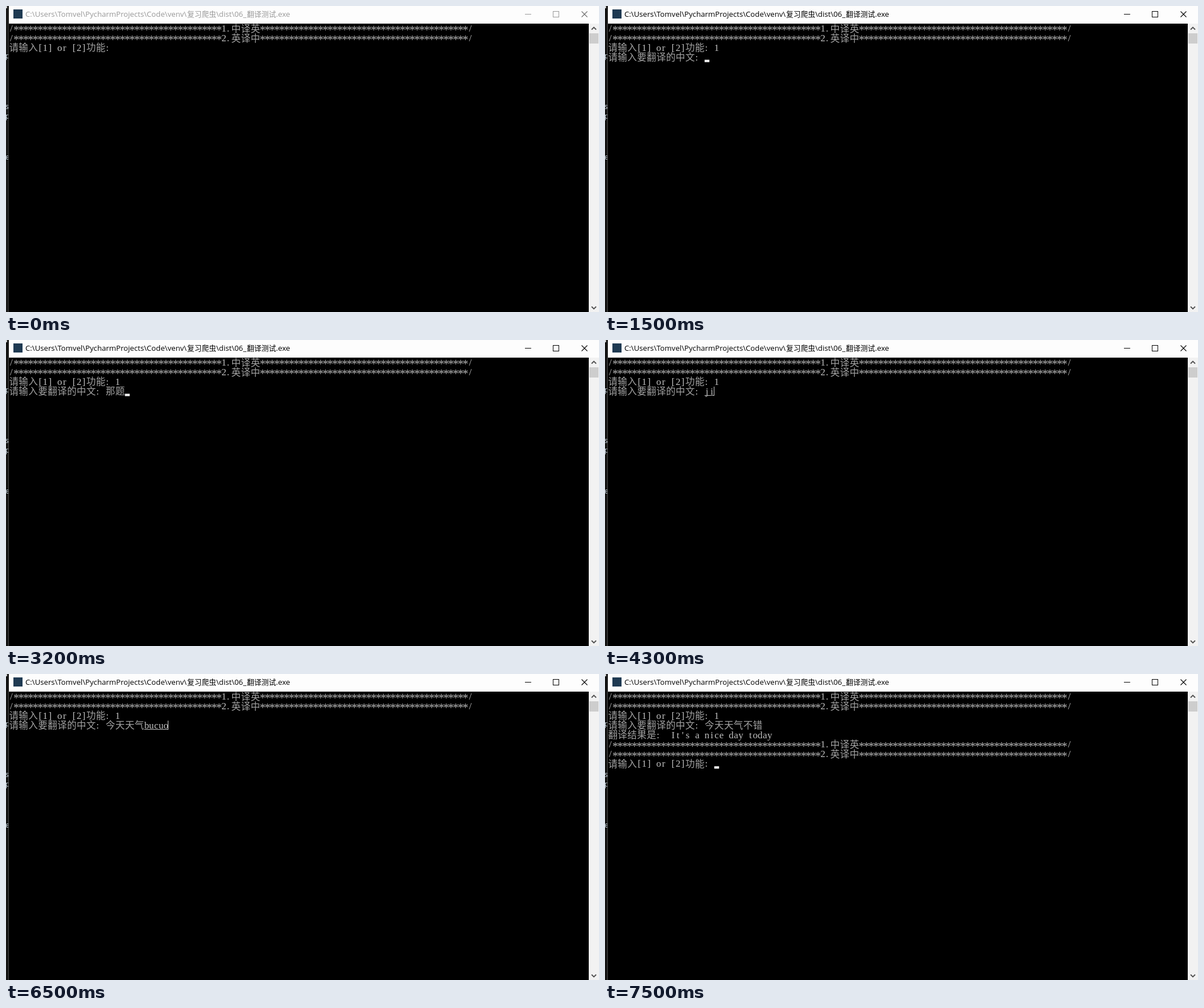
Animation, 1041 px wide and 538 px high, one loop 8000 ms. Source, as an HTML page with a canvas:

```html
<!DOCTYPE html>
<html lang="zh-CN">
<head>
<meta charset="utf-8">
<title>Console translator</title>
<style>
html, body { margin: 0; width: 100%; height: 100%; overflow: hidden; background: #000; }
canvas { display: block; }
</style>
</head>
<body>
<canvas id="stage" width="1041" height="538"></canvas>
<script>
const ctx = document.getElementById('stage').getContext('2d');
const LOOP = 8000;
const CELL = 8.48, ROW = 16.93, LEFT = 5.2, TOP = 30.8;
const CJK = '"Noto Sans CJK SC", "Noto Sans CJK JP", "Noto Sans CJK", sans-serif';
const LATIN = '"Liberation Serif", serif';

const stars = '*'.repeat(43);
const menu = `/${stars}1.中译英${stars}/\n/${stars}2.英译中${stars}/\n请输入[1] or [2]功能: `;
const ask = menu + '1\n请输入要翻译的中文: ';
const sent = ask + '今天天气不错\n';

// █ is the block cursor, {…} is text still being composed
const steps = [
  [0, menu], [600, menu + '█'], [1000, menu], [1100, menu + '1█'],
  ...[
    [1500, '█'], [2000, '{na}'], [2100, '{nan}'], [2500, '{n}'], [2600, '█'],
    [3000, '{na}'], [3100, '{nati}'], [3200, '那题█'], [3500, '那题'],
    [3800, '那█'], [4000, '█'],
    [4300, '{ji}'], [4400, '{jin}'], [4500, '{jint}'], [4700, '今天█'], [4900, '今天'],
    [5300, '今天{ti}'], [5400, '今天{tia}'], [5500, '今天{tian}'], [5700, '今天{tianqi}'],
    [5900, '今天天气█'], [6100, '今天天气{bu}'], [6400, '今天天气{buc}'],
    [6500, '今天天气{bucuo}'], [6600, '今天天气不错█']
  ].map(([t, typed]) => [t, ask + typed]),
  [6800, sent + '█'], [6900, sent], [7300, sent + '█'],
  [7500, sent + "翻译结果是:  It's a nice day today\n" + menu + '█']
];

function rect(x, y, w, h, color) {
  ctx.fillStyle = color;
  ctx.fillRect(x, y, w, h);
}

function text(str, x, y, font, color, align = 'left') {
  ctx.font = font;
  ctx.fillStyle = color;
  ctx.textAlign = align;
  ctx.fillText(str, x, y);
}

function line(color, width, ...points) {
  ctx.strokeStyle = color;
  ctx.lineWidth = width;
  ctx.beginPath();
  points.forEach(([x, y]) => ctx.lineTo(x, y));
  ctx.stroke();
}

function glyph(ch, x, y) {
  const mid = x + CELL / 2;
  if (ch > '\u00ff') text(ch, x + CELL, y + 14.8, '300 16.6px ' + CJK, '#a2a2a2', 'center');
  else if (ch === '*') text(ch, mid, y + 18.6, '20px ' + LATIN, '#b4b4b4', 'center');
  else text(ch, '.:'.includes(ch) ? mid - 1.2 : mid, y + 14, '17px ' + LATIN, '#c0c0c0', 'center');
}

function drawConsole(log) {
  let x = LEFT, y = TOP, start = 0;
  for (const ch of log) {
    if (ch === '\n') {
      x = LEFT;
      y += ROW;
    } else if (ch === '█') {
      rect(x, y + 12.9, CELL, 4.2, '#f4f4f4');
    } else if (ch === '{') {
      start = x;
    } else if (ch === '}') {
      rect(start, Math.round(y + 15.4), x - start, 1, '#c0c0c0');
      rect(Math.round(x - 1), y + 0.4, 1, 16, '#d0d0d0');
    } else {
      glyph(ch, x, y);
      x += ch > '\u00ff' ? 2 * CELL : CELL;
    }
  }
}

function drawTitle(t) {
  const ink = t < 600 ? '#999' : '#000';
  const cross = t < 100 ? '#6a6a6a' : t < 200 ? '#838383' : ink;
  const latin = '13.2px "Open Sans", "Noto Sans", sans-serif';
  const han = '12.75px ' + CJK;
  rect(5, 0, 1036, 31, '#fdfdfd');
  rect(13, 6, 16, 16, '#1f3a52');
  [
    ['C:\\Users\\Tomvel\\PycharmProjects\\Code\\venv\\', 34, latin],
    ['复习爬虫', 318, han],
    ['\\dist\\06_', 369, latin],
    ['翻译测试', 423, han],
    ['.exe', 474, latin]
  ].forEach(([str, x, font]) => text(str, x, 19.2, font, ink));
  rect(911, 14, 11, 1, ink);
  ctx.strokeStyle = ink;
  ctx.lineWidth = 1;
  ctx.strokeRect(960.5, 9.5, 10, 10);
  line(cross, 1.1, [1010.5, 9.5], [1020.5, 19.5]);
  line(cross, 1.1, [1020.5, 9.5], [1010.5, 19.5]);
}

function drawScrollbar() {
  rect(1023, 31, 18, 507, '#f2f2f2');
  rect(1024, 48, 16, 18, '#cdcdcd');
  line('#505050', 1.8, [1028, 41.5], [1032, 37.5], [1036, 41.5]);
  line('#505050', 1.8, [1028, 528.5], [1032, 532.5], [1036, 528.5]);
}

// Sliver of the editor behind the window
function drawBackdrop(t) {
  const active = t >= 600;
  rect(0, 0, 5, 538, active ? '#141414' : '#1a1a1a');
  ctx.save();
  ctx.beginPath();
  ctx.rect(0, 0, active ? 4 : 5, 538);
  ctx.clip();
  [['p', 92], ['s', 181], ['p', 198], ['e', 270]].forEach(([ch, y]) =>
    text(ch, -1.2, y, '13px "Open Sans", sans-serif', '#d4e2ee'));
  rect(0, 0, 2, 4, '#c8c8c8');
  ctx.restore();
  rect(4, 31, 1, 507, active ? '#4a4a4a' : '#333');
}

function draw(now) {
  const t = now % LOOP;
  rect(0, 0, 1041, 538, '#000');
  drawBackdrop(t);
  drawTitle(t);
  drawScrollbar();
  drawConsole(steps.findLast(step => step[0] <= t)[1]);
}

let begin;
function tick(now) {
  begin ??= now;
  draw(Math.max(0, now - begin));
  requestAnimationFrame(tick);
}
draw(0);
requestAnimationFrame(tick);
</script>
</body>
</html>
```
